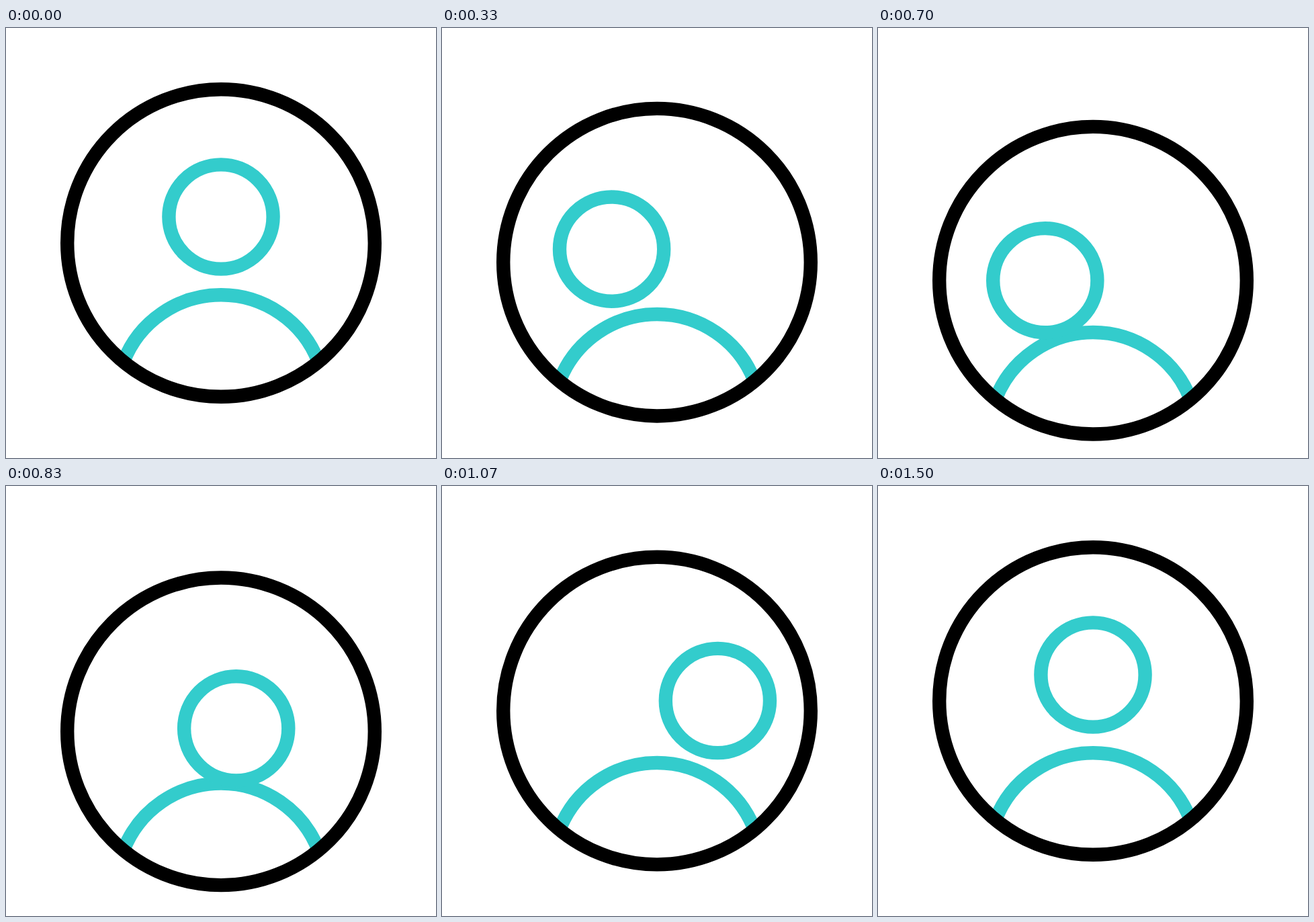
These frames come from a looping animation (640x640 px, 2 s). An HTML page:

```html
<!DOCTYPE html>
<html lang="en">
<head>
<meta charset="utf-8">
<title>Profile</title>
<style>
  html, body { margin: 0; height: 100%; overflow: hidden; background: #fff; }
  svg { display: block; width: 100%; height: 100%; fill: none; stroke-width: 20.4; }
</style>
</head>
<body>
<svg viewBox="0 0 640 640">
  <g id="badge">
    <path d="M174.9 496.9A155.5 155.5 0 0 1 465.1 496.9" stroke="#3cc"/>
    <circle cx="320" cy="320" r="228.8" stroke="#000"/>
    <circle id="head" cx="320" cy="281" r="77.6" stroke="#3cc"/>
  </g>
</svg>
<script>
const LOOP = 2000, FPS = 30;
const badge = document.getElementById('badge');
const head = document.getElementById('head');

// Eased progress from 0 to 1 between two steps
function ease(step, start, end) {
  const u = Math.min(1, Math.max(0, (step - start) / (end - start)));
  return u * u * (3 - 2 * u);
}

function move(node, x, y) {
  node.setAttribute('transform', `translate(${x} ${y})`);
}

function draw() {
  const ms = performance.now() % LOOP;
  const step = Math.floor((ms + 3.4) * FPS / 1000);
  const during = (start, end) => ease(step, start, end);

  // The badge dips and rises; the head swings left, right and back inside it
  const dip = 56.4 * (during(0, 19.8) - during(19.8, 38.1));
  const swing = -104.3 * during(0, 16.7) + 199.7 * during(17.9, 29.9) - 95.4 * during(29.9, 45);
  const sink = 39 * during(0, 20) - 12 * during(22.5, 28.5) - 27 * during(28.5, 45);

  move(badge, 0, dip);
  move(head, swing, sink);
  requestAnimationFrame(draw);
}
draw();
</script>
</body>
</html>
```
